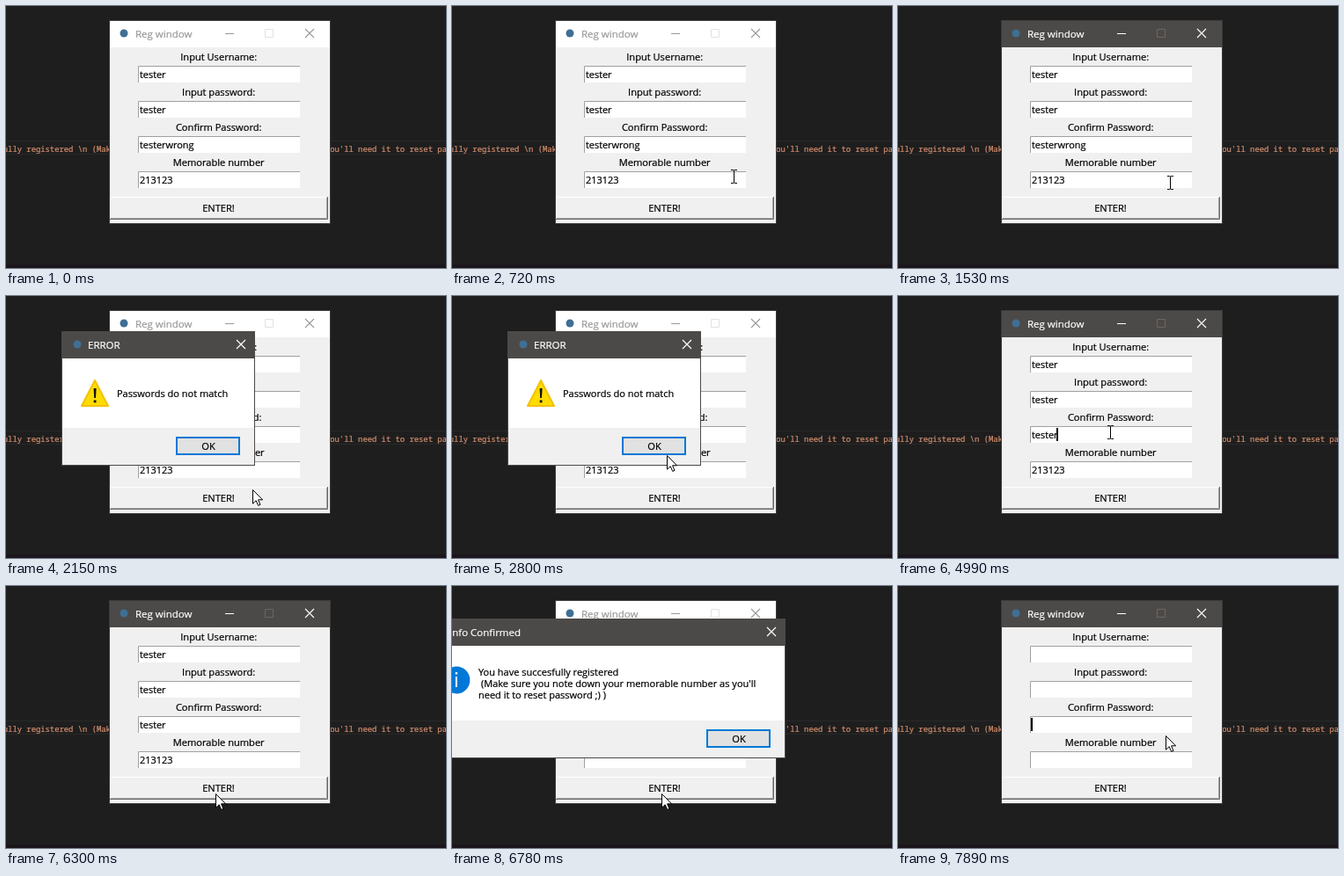
These frames come from a looping animation (500 px wide and 298 px high, 8000 ms). An HTML page:

```html
<!DOCTYPE html>
<html lang="en">
<head>
<meta charset="utf-8">
<title>Reg window</title>
<style>
  html, body { margin: 0; width: 100%; height: 100%; overflow: hidden; background: #1e1e1e; }
  svg { display: block; width: 100%; height: 100%; }
  text { font: 11.1px "Open Sans", "Noto Sans", sans-serif; white-space: pre; stroke-width: 0.22; }
  .code { font: 8.85px "Noto Sans Mono", "DejaVu Sans Mono", monospace; }
  .title { font-size: 11.5px; }
  .msg { font-size: 11px; }
  .entry { font-size: 10.9px; }
  .mid { text-anchor: middle; }
</style>
</head>
<body>
<svg id="stage" viewBox="0 0 500 298" xmlns="http://www.w3.org/2000/svg"></svg>
<script>
const LOOP = 8000;
const stage = document.getElementById('stage');

function add(parent, tag, attrs, content) {
  const el = document.createElementNS('http://www.w3.org/2000/svg', tag);
  for (const k in attrs) el.setAttribute(k, attrs[k]);
  if (content !== undefined) el.textContent = content;
  parent.appendChild(el);
  return el;
}
const rect = (p, x, y, width, height, fill) => add(p, 'rect', { x, y, width, height, fill });
const text = (p, x, y, s, cls = '', fill = '#000') =>
  add(p, 'text', { x, y, class: cls, fill, stroke: fill }, s);
const line = (p, d, stroke, width = 1) =>
  add(p, 'path', { d, stroke, 'stroke-width': width, fill: 'none' });
const show = (el, on) => el.setAttribute('visibility', on ? 'visible' : 'hidden');
const cross = (x, y) => `M${x - 5} ${y - 5}l10 10m0 -10l-10 10`;
const appIcon = (p, x, y) => add(p, 'circle', { cx: x, cy: y, r: 4.5, fill: '#3f6f94' });

// Editor behind the windows
rect(stage, 0, 0, 500, 298, '#1e1e1e');
rect(stage, 0, 294, 500, 4, '#1b161b');
line(stage, 'M0 153.5H500M0 168.5H500', '#282828');
text(stage, -3.2, 166, 'ully registered \\n (Make sure you note down your memorable ' +
  "number as you'll need it to reset password ;) )", 'code', '#d08c6c');

// Registration window
const win = add(stage, 'g', {});
rect(win, 117, 16, 252, 232, '#3c3b3a');
const bar = rect(win, 118, 17, 250, 30, '#fff');
rect(win, 118, 47, 250, 200, '#f0f0f0');
appIcon(win, 134, 31);
const barText = text(win, 147, 36, 'Reg window', 'title');
const barMin = line(win, 'M249 31.5h10', '#999');
const barMax = line(win, 'M294.5 26.5h9v9h-9z', '#ddd');
const barClose = line(win, cross(345, 31), '#999', 1.1);

const labels = ['Input Username:', 'Input password:', 'Confirm Password:', 'Memorable number'];
const rows = labels.map((label, i) => {
  const y = 68 + i * 40;
  text(win, 241.7, y - 6, label, 'mid');
  rect(win, 150, y, 184, 19, '#fff');
  line(win, `M150.5 ${y + 19}V${y + 0.5}H334`, '#a0a0a0');
  return text(win, 152, y + 14, '', 'entry');
});
const caret = rect(win, 0, 0, 2, 15, '#000');

rect(win, 118, 217, 248.5, 26, '#f0f0f0');
const edgeA = line(win, 'M118.5 243V217.5H366', '#fff');
const edgeB = line(win, 'M118 242.5H365.5V217', '#696969');
const edgeC = line(win, 'M119 241.5H364.5V218', '#a0a0a0');
const enter = text(win, 241.5, 234, 'ENTER!', 'mid');

function makeDialog(x, y, w, h, title, baseline, lines) {
  const g = add(stage, 'g', {});
  const r = x + w, b = y + h;
  rect(g, x, y, w, h, '#4c4a48');
  rect(g, x + 1, y + 31, w - 2, h - 32, '#fff');
  rect(g, x + 1, b - 43, w - 2, 42, '#f0f0f0');
  appIcon(g, x + 18, y + 15);
  text(g, x + 30, y + 19.5, title, 'title', '#fff');
  line(g, cross(r - 16, y + 15), '#fff', 1.2);
  lines.forEach((s, i) => text(g, x + 63 + (s[0] === '(' ? 3 : 0), baseline + i * 13, s, 'msg'));
  const box = { x: r - 90, y: b - 33, w: 73, h: 21 };
  const ok = rect(g, box.x + 1, box.y + 1, box.w - 2, box.h - 2, '#e1e1e1');
  text(g, r - 53, b - 18.5, 'OK', 'mid');
  return { g, ok, box, cx: x + w / 2, cy: y + h / 2 };
}

const errorBox = makeDialog(63, 40, 220, 153, 'ERROR', 115, ['Passwords do not match']);
add(errorBox.g, 'path', { d: 'M101 96L116 125H86Z', fill: '#ffdc00', stroke: '#f2c200',
  'stroke-width': 2, 'stroke-linejoin': 'round' });
add(errorBox.g, 'path', { d: 'M99.6 105h3l-.6 11h-1.8zM99.7 118.5h2.8v2.8h-2.8z', fill: '#111' });

const infoBox = makeDialog(-33, 37, 412, 159, 'Info Confirmed', 102, [
  'You have succesfully registered',
  "(Make sure you note down your memorable number as you'll",
  'need it to reset password ;) )'
]);
add(infoBox.g, 'circle', { cx: 5, cy: 107, r: 15.4, fill: '#0078d7' });
add(infoBox.g, 'path', { d: 'M4 103h2v12h-2zM3.8 98h2.4v2.4h-2.4z', fill: '#fff' });

Object.assign(errorBox, { from: 2070, full: 2150, press: 3080, to: 3160 });
Object.assign(infoBox, { from: 6620, full: 6780, press: 7770, to: 7890 });
const dialogs = [errorBox, infoBox];

// Pointer
const pointer = add(stage, 'g', {});
const arrow = add(pointer, 'path', { d: 'M.5 .5V16.2L4.2 12.7L6.7 18.4L9 17.4L6.6 11.8H11.6Z',
  fill: '#fff', stroke: '#000', 'stroke-width': 1 });
const beam = line(pointer, 'M-3.5 -7.5H-1Q0 -7.5 0 -6.5Q0 -7.5 1 -7.5H3.5M0 -7V7' +
  'M-3.5 7.5H-1Q0 7.5 0 6.5Q0 7.5 1 7.5H3.5', '#000');

// time, x, y
const path = [
  [100, 432, 306], [780, 318, 192], [920, 318, 192], [1170, 335, 187], [1530, 309, 201],
  [1770, 280, 220], [2380, 280, 220], [3000, 232, 169], [3420, 232, 169], [3430, 235, 165],
  [3510, 241, 155], [3710, 241, 155], [3720, 242, 151], [3810, 242, 151], [3820, 241, 155],
  [5910, 241, 155], [6300, 238, 236], [7070, 238, 236], [7480, 324, 160], [7780, 304, 170]
];

function pointerAt(t) {
  const i = path.findIndex(p => p[0] > t);
  if (i === 0) return path[0].slice(1);
  if (i < 0) return path[path.length - 1].slice(1);
  const [t0, x0, y0] = path[i - 1], [t1, x1, y1] = path[i];
  const u = (t - t0) / (t1 - t0), k = u * u * (3 - 2 * u);
  return [x0 + (x1 - x0) * k, y0 + (y1 - y0) * k];
}

const within = (x, y, b) => x >= b.x && x < b.x + b.w && y >= b.y && y < b.y + b.h;
const between = (t, a, b) => t >= a && t < b;
const deletions = [4380, 4530, 4680, 4830, 4990];

// Caret row, or -1 while blinked off or unfocused; 600 ms on, 300 ms off
function caretRow(t) {
  for (const [from, to, row] of [[780, 2070, 3], [3160, 3720, 3], [3720, 6400, 2], [7890, LOOP, 2]]) {
    if (between(t, from, to)) return (t - from) % 900 < 600 ? row : -1;
  }
  return -1;
}

function drawWindow(t, open) {
  const active = t >= 780 && !open;
  const ink = active ? '#fff' : '#999';
  bar.setAttribute('fill', active ? '#4c4a48' : '#fff');
  barText.setAttribute('fill', ink);
  barText.setAttribute('stroke', ink);
  barMin.setAttribute('stroke', ink);
  barClose.setAttribute('stroke', ink);
  barMax.setAttribute('stroke', active ? '#70655f' : '#e2e2e2');

  const gone = deletions.filter(d => t >= d).length;
  const values = ['tester', 'tester', 'testerwrong'.slice(0, 11 - gone), '213123'];
  rows.forEach((row, i) => {
    const s = t < infoBox.from ? values[i] : '';
    if (row.textContent !== s) row.textContent = s;
  });

  const row = caretRow(t);
  show(caret, row >= 0);
  if (row >= 0) {
    const len = rows[row].textContent ? rows[row].getComputedTextLength() : 0;
    caret.setAttribute('x', Math.max(151, Math.round(150 + len)));
    caret.setAttribute('y', 70 + row * 40);
  }

  const down = between(t, 1930, 2030) || between(t, 6490, 6590);
  edgeA.setAttribute('stroke', down ? '#696969' : '#fff');
  edgeB.setAttribute('stroke', down ? '#fff' : '#696969');
  edgeC.setAttribute('stroke', down ? '#e3e3e3' : '#a0a0a0');
  enter.setAttribute('transform', down ? 'translate(1 1)' : '');
}

function drawDialog(d, t, x, y) {
  const on = between(t, d.from, d.to);
  show(d.g, on);
  if (!on) return;
  const k = Math.min(1, 0.25 + 0.75 * (t - d.from) / (d.full - d.from));
  const s = 0.92 + 0.08 * k;
  d.g.setAttribute('opacity', k);
  d.g.setAttribute('transform', `translate(${d.cx} ${d.cy}) scale(${s}) translate(${-d.cx} ${-d.cy})`);
  const hover = within(x, y, d.box), press = t >= d.press;
  d.ok.setAttribute('fill', press ? '#cce4f7' : hover ? '#e5f1fb' : '#e1e1e1');
  d.ok.setAttribute('stroke', press ? '#005499' : '#0078d7');
  d.ok.setAttribute('stroke-width', hover ? 1.2 : 2);
}

function draw(t) {
  const open = dialogs.some(d => between(t, d.from, d.to));
  const [x, y] = pointerAt(t);
  drawWindow(t, open);
  dialogs.forEach(d => drawDialog(d, t, x, y));

  const inWin = within(x, y, { x: 117, y: 16, w: 252, h: 232 });
  const inRow = rows.some((_, i) => within(x, y, { x: 150, y: 68 + i * 40, w: 184, h: 19 }));
  const isBeam = !open && (inRow || !inWin);
  show(arrow, !isBeam);
  show(beam, isBeam);
  beam.setAttribute('stroke', inWin ? '#000' : '#e8e8e8');
  show(pointer, t >= 120);
  pointer.setAttribute('transform', `translate(${Math.round(x) + (isBeam ? 0.5 : 0)} ${Math.round(y)})`);
}

const start = performance.now();
function tick() {
  draw((performance.now() - start) % LOOP);
  requestAnimationFrame(tick);
}
tick();
</script>
</body>
</html>
```
